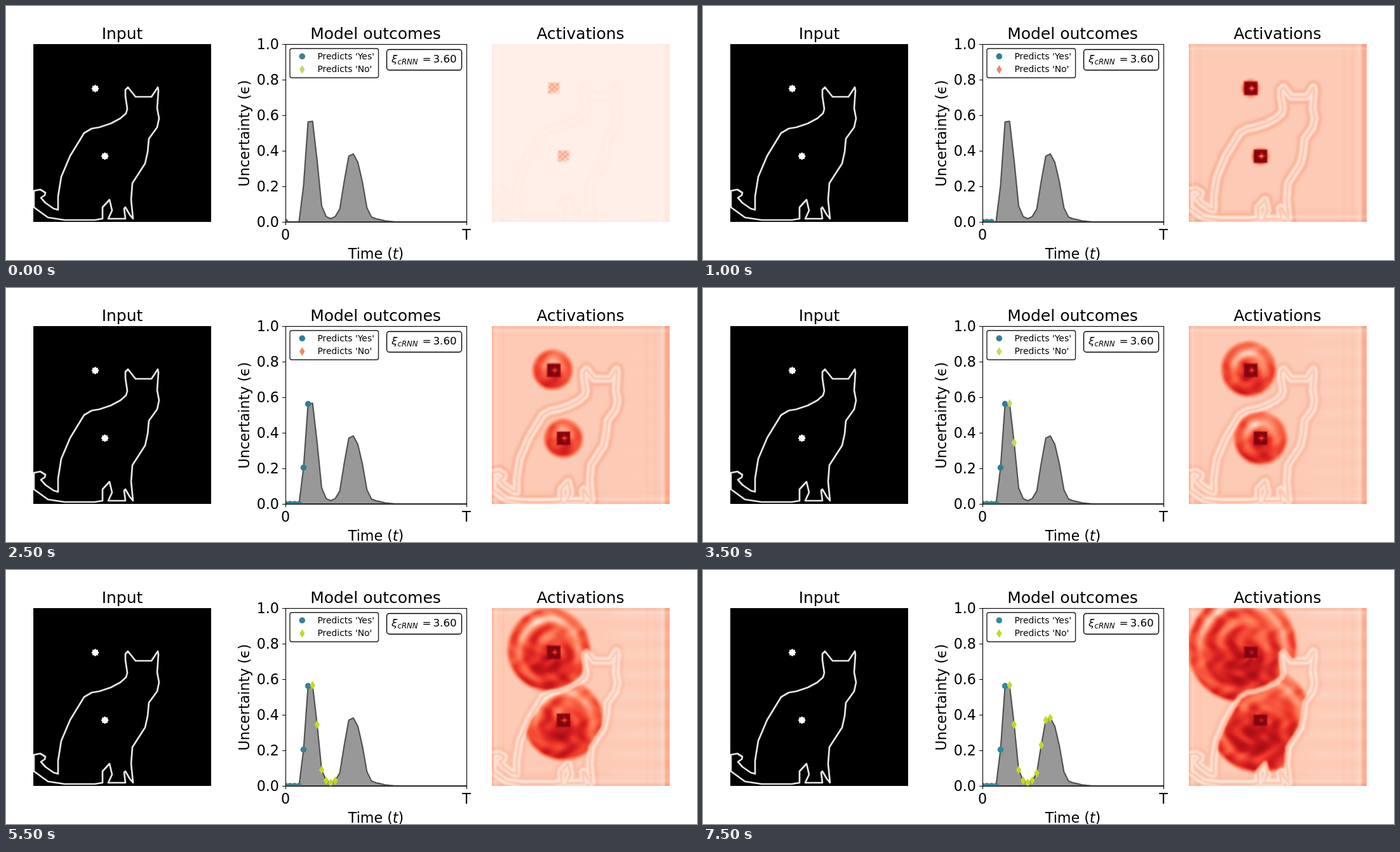
Write an HTML page with a canvas that moves like this. It is 1088 by 400 pixels and loops after 8000 ms.

```html
<!DOCTYPE html>
<html lang="en">
<head>
<meta charset="utf-8">
<title>Model outcomes</title>
<style>
html, body { margin: 0; width: 1088px; height: 400px; overflow: hidden; background: #fff; }
svg, canvas { position: absolute; display: block; }
svg { left: 0; top: 0; }
canvas { left: 765px; top: 60px; width: 280px; height: 280px; }
text { font-family: "DejaVu Sans", sans-serif; font-size: 22.22px; fill: #000; }
.title { font-size: 25px; text-anchor: middle; }
.mid { text-anchor: middle; }
.end { text-anchor: end; }
.key { font-size: 13.89px; }
.score { font-size: 16.67px; }
.sub { font-size: 11.67px; }
.it { font-style: italic; }
.yes { fill: var(--yes); }
.no { fill: var(--no); }
</style>
</head>
<body>
<canvas id="map" width="150" height="150"></canvas>
<svg id="stage" width="1088" height="400" viewBox="0 0 1088 400">
  <defs><clipPath id="axes"><rect x="440" y="60" width="285" height="281"/></clipPath></defs>
  <text class="title" x="183" y="52">Input</text>
  <text class="title" x="582" y="52">Model outcomes</text>
  <text class="title" x="904.5" y="52">Activations</text>

  <rect x="43" y="60" width="280" height="280"/>
  <svg x="43" y="60" width="280" height="280" viewBox="43 60 280 280">
    <path id="cat" fill="none" stroke="#e6e6e6" stroke-width="2.7" stroke-linejoin="round"/>
    <path id="stars" fill="#fff"/>
  </svg>

  <g clip-path="url(#axes)">
    <path id="area" fill="#989898" stroke="#505050" stroke-width="2.1" stroke-linejoin="round"/>
    <g id="marks"></g>
  </g>
  <rect x="440.5" y="60.5" width="285" height="280" fill="none" stroke="#000" stroke-width="1.1"/>
  <path id="ticks" stroke="#000" stroke-width="1.1"/>
  <g id="labels"></g>
  <text class="mid" x="440" y="368">0</text>
  <text class="mid" x="725" y="368">T</text>
  <text class="mid" x="582.5" y="398">Time (<tspan class="it">t</tspan>)</text>
  <text class="mid" transform="translate(383 200.5) rotate(-90)">Uncertainty (ϵ)</text>

  <rect x="447" y="67" width="139.5" height="46" rx="3" fill="#fff" stroke="#222" stroke-width="1.4"/>
  <circle class="yes" cx="466.3" cy="79.3" r="4.8"/>
  <path class="no" d="M466.3 93.2l4.2 6.8-4.2 6.8-4.2-6.8z"/>
  <text class="key" x="490.5" y="84">Predicts 'Yes'</text>
  <text class="key" x="490.5" y="104.4">Predicts 'No'</text>

  <rect x="599.5" y="68.5" width="118" height="32.5" rx="4" fill="#fff" stroke="#000" stroke-width="1.4"/>
  <text class="score it" x="607" y="89">ξ</text>
  <text class="sub it" x="616.5" y="91.5">cRNN</text>
  <text class="score" x="655.5" y="89">=</text>
  <text class="score" x="672.5" y="89">3.60</text>
</svg>
<script>
const STEP = 500, COUNT = 16, N = 150, CELL = 280 / N, SHIFT = 722;
const $ = id => document.getElementById(id);

const outline = `192,128 204,143 229,143 239,128 240,133 238,161 241,177 238,191 225,209 223,230
  219,248 199,279 197,305 200,335 195,329 188,317 186,319 188,335 161,335 167,322 163,305 152,317
  152,335 140,337 92,337 66,333 44,317 44,291 54,289 62,294 61,298 55,302 62,310 75,319 82,321
  82,300 87,269 101,236 123,200 135,193 147,191 165,185 180,177 189,169 191,162 188,142 188,132`
  .trim().split(/\s+/).map(p => p.split(',').map(Number));

const curve = [0, 0, 0, 0, .204, .562, .566, .345, .09, .03, .018, .03, .072, .23, .37, .382,
  .335, .225, .08, .028, .018, .012, .006, .003, .001];

// First step at which each pair of marker colours applies
const inks = [[0, '#487b8e', '#c8d368'], [1, '#2e7f95', '#ee8765'], [6, '#307f95', '#c5d956'],
  [10, '#3d7f92', '#c4d922'], [12, '#497c8c', '#c0d93a'], [14, '#2d8ba3', '#c5d921']];

// Static chart parts
const px = i => 440 + 7.125 * i;
const py = v => 340 - 280 * v;

function drawChart() {
  $('cat').setAttribute('d', 'M' + outline.join('L') + 'Z');
  const star = (x, y) => {
    const pts = Array.from({ length: 16 }, (_, i) => {
      const r = i % 2 ? 4.7 : 6.2, a = i * Math.PI / 8;
      return [x + r * Math.cos(a), y + r * Math.sin(a)];
    });
    return 'M' + pts.join('L') + 'Z';
  };
  $('stars').setAttribute('d', star(140.5, 130) + star(155.7, 236.5));

  const line = curve.map((v, i) => [px(i), py(v)]);
  $('area').setAttribute('d', 'M' + line.join('L') + 'L725,340Z');

  let ticks = 'M440.5 340v5M725.5 340v5', labels = '';
  for (let i = 0; i <= 5; i++) {
    const y = 340 - 56 * i;
    ticks += `M435 ${y + .5}h5`;
    labels += `<text class="end" x="430" y="${y + 8}">${(i / 5).toFixed(1)}</text>`;
  }
  $('ticks').setAttribute('d', ticks);
  $('labels').innerHTML = labels;

  $('marks').innerHTML = curve.slice(0, COUNT).map((v, i) => i < 6
    ? `<circle class="yes" cx="${px(i)}" cy="${py(v)}" r="4.8"/>`
    : `<path class="no" d="M${px(i)} ${py(v) - 6.8}l4.2 6.8-4.2 6.8-4.2-6.8z"/>`).join('');
}

// Activation field
const reds = [[255, 245, 240], [254, 224, 210], [252, 187, 161], [252, 146, 114], [251, 106, 74],
  [239, 59, 44], [203, 24, 29], [165, 15, 21], [103, 0, 13]];
const seeds = [
  { x: 862.5, y: 129.5, side: 1, size: 1, lean: .012 },
  { x: 877.7, y: 236.5, side: -1, size: .97, lean: 0 }
];
const clamp = v => Math.max(0, Math.min(1, v));
const smooth = (a, b, v) => { const t = clamp((v - a) / (b - a)); return t * t * (3 - 2 * t); };
const bump = (v, at, w) => Math.exp(-(((v - at) / w) ** 2));

// Signed distance to the outline, negative inside
function signedDistance(x, y) {
  let best = 1e9, inside = false;
  outline.forEach(([ax, ay], i) => {
    const [bx, by] = outline[(i + 1) % outline.length];
    const dx = bx - ax, dy = by - ay;
    const t = clamp(((x - ax) * dx + (y - ay) * dy) / (dx * dx + dy * dy));
    best = Math.min(best, Math.hypot(x - ax - t * dx, y - ay - t * dy));
    if ((ay > y) !== (by > y) && x < ax + dx * (y - ay) / dy) inside = !inside;
  });
  return inside ? -best : best;
}

const cells = [];
for (let j = 0; j < N; j++) for (let i = 0; i < N; i++) {
  const x = 765 + (i + .5) * CELL, y = 60 + (j + .5) * CELL;
  cells.push({ x, y, d: signedDistance(x - SHIFT, y) });
}

function frame(x, y) {
  return .1 * smooth(1036, 1039, x) + .07 * bump(x, 765, 3) + .06 * bump(y, 60, 3) + .06 * bump(y, 340, 3)
    - .035 * (bump(x, 771, 2) + bump(y, 67, 2) + bump(x, 1033, 2) + bump(y, 332, 2))
    + .015 * (bump(x, 1022, 2) + bump(x, 1009, 2) + bump(x, 783, 2) + bump(y, 322, 2));
}

function spread(v, x, y, d, s, seed) {
  const dx = x - seed.x, dy = y - seed.y;
  const r = Math.hypot(dx, dy), a = Math.atan2(dy, dx);
  const reach = (5 + 6.4 * s - .05 * s * s) * seed.size * (1 + seed.lean * s * Math.cos(a + 2.6));
  const u = reach - r;
  if (u <= 0) return v;
  const age = Math.min(1, s / 9);
  const dip = .32 * (.5 + .5 * Math.cos(a + 2)) * smooth(3, 6, s);
  const level = .6 + .1 * smooth(20, 45, u) + .09 * Math.cos(a - 1.9)
    - dip * bump(u, 23, 7) - .5 * dip * bump(u, 52, 9)
    + age * (.05 * Math.sin(3 * a + u * .22) + .045 * Math.sin(x * .19 + 2 * Math.sin(y * .13) + s * .4));
  const mask = smooth(0, 10, u) * smooth(0, 6, seed.side * d);
  return v + (level - v) * mask;
}

function core(v, x, y, s, seed) {
  const dx = x - seed.x, dy = y - seed.y;
  const far = Math.max(Math.abs(dx), Math.abs(dy) * (s > 13 ? 1.2 : 1));
  const mask = 1 - smooth(9, 12, far);
  if (s === 0) {
    const speck = .25 + .12 * Math.sin(x * .75 + 1) * Math.sin(y * .8) - .1 * smooth(3, 9, dy + dx * .5);
    return v + (speck - v) * (1 - smooth(7, 11, far));
  }
  v += ((s === 1 ? .75 : .95) - v) * mask;
  const sx = dx - 1.5, glow = s < 12 ? .42 : .25;
  const star = Math.exp(-Math.abs(sx * dy) / 5 - (sx * sx + dy * dy) / (s < 12 ? 20 : 9));
  return v - (s < 3 ? .6 : glow) * star;
}

function paint(s) {
  const ctx = $('map').getContext('2d'), img = ctx.createImageData(N, N);
  const bg = [.035, .14][s] ?? .2;
  const power = [.3, .75][s] ?? 1;
  cells.forEach(({ x, y, d }, i) => {
    const e = Math.abs(d), later = smooth(4, 9, s);
    let v = bg + power * frame(x, y);
    if (s === 0) v += .02 * bump(e, 6, 3);
    else {
      v += power * ((.075 - .035 * later) * bump(e, 9, 2.7) + .03 * bump(e, 0, 1.5));
      v -= .012 * later * smooth(930, 980, x) * (1 + Math.sin(y * .2));
    }
    if (s > 0) for (const seed of seeds) v = spread(v, x, y, d, s, seed);
    if (s > 0) v -= power * .09 * bump(e, 3.6, 2.2);
    for (const seed of seeds) v = core(v, x, y, s, seed);

    const q = clamp(v) * 8, k = Math.min(7, Math.floor(q));
    for (let c = 0; c < 3; c++) img.data[i * 4 + c] = reds[k][c] + (reds[k + 1][c] - reds[k][c]) * (q - k);
    img.data[i * 4 + 3] = 255;
  });
  ctx.putImageData(img, 0, 0);
  return img;
}

drawChart();
const maps = Array.from({ length: COUNT }, (_, s) => paint(s));
const marks = [...$('marks').children];
const start = performance.now();
let shown = -1;

function show(s) {
  if (s === shown) return;
  shown = s;
  $('map').getContext('2d').putImageData(maps[s], 0, 0);
  marks.forEach((m, i) => { m.style.display = i <= s ? '' : 'none'; });
  const [, yes, no] = inks.filter(row => row[0] <= s).pop();
  $('stage').style.setProperty('--yes', yes);
  $('stage').style.setProperty('--no', no);
}

function tick() {
  const t = Math.max(0, performance.now() - start);
  show(Math.floor(t / STEP) % COUNT);
  requestAnimationFrame(tick);
}
show(0);
tick();
</script>
</body>
</html>
```
